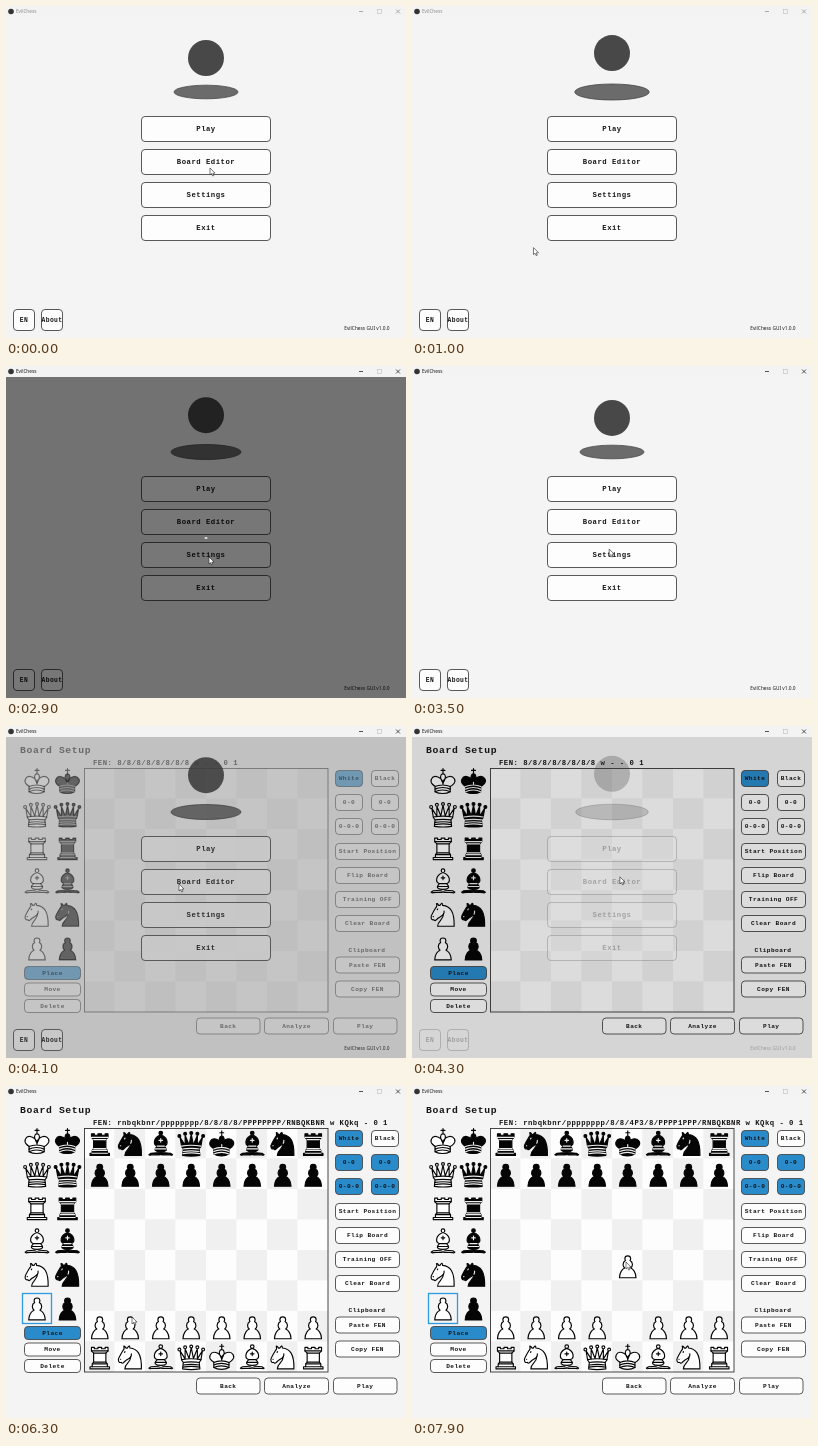
An HTML page with a canvas that plays this animation: 400x332 px, repeating every 8000 ms.

```html
<!DOCTYPE html>
<html lang="en">
<head>
<meta charset="utf-8">
<title>EvilChess</title>
<style>
html, body { margin: 0; width: 400px; height: 332px; overflow: hidden; background: #f4f4f4; }
canvas { display: block; }
</style>
</head>
<body>
<canvas id="stage" width="400" height="332"></canvas>
<script>
const ctx = document.getElementById('stage').getContext('2d');
const LOOP = 8000, STEP = 100;
const INK = '#151515', BLUE = '#2a8bcb', PAPER = '#f4f4f4';
const MONO = '"Liberation Mono", "DejaVu Sans Mono", monospace';
const SANS = '"Noto Sans", "Open Sans", sans-serif';
const SQUARE = 30.5, BOARD_X = 78, BOARD_Y = 42;

const clamp = v => Math.max(0, Math.min(1, v));
const ramp = (t, from, to) => clamp((t - from) / (to - from));

// Pointer stops: time, x, y
const PATH = [
  [0, 204, 162], [300, 204, 162], [900, 128, 236], [1500, 40, 312], [1600, 40, 312],
  [1800, 60, 287], [2500, 203, 191], [2900, 203, 191], [3400, 200, 186],
  [3900, 173, 158], [4100, 173, 158], [4800, 349, 122], [5100, 349, 122],
  [5900, 30, 222], [6000, 30, 222], [6300, 126, 231], [6700, 216, 240],
  [6800, 216, 240], [7300, 214, 176], [8000, 214, 176]
];

function pointerAt(t) {
  const i = Math.max(1, PATH.findIndex(p => p[0] > t));
  const [t0, x0, y0] = PATH[i - 1], [t1, x1, y1] = PATH[i];
  const k = ramp(t, t0, t1), e = k * k * (3 - 2 * k);
  return [x0 + (x1 - x0) * e, y0 + (y1 - y0) * e];
}

// Chess pieces on a 45 unit square: filled body and inner lines
const ball = (x, y, r) => `M${x - r} ${y}a${r} ${r} 0 1 1 ${2 * r} 0a${r} ${r} 0 1 1 ${-2 * r} 0z`;
const shape = (body, lines = '') => [new Path2D(body), new Path2D(lines)];
const PIECES = {
  k: shape(`M22.5 12V5h0M19.8 7.5h5.4M22.5 25s4.5-7.5 3-10.5c-1-3-5-3-6 0-1.5 3 3 10.5 3 10.5
    M11.5 37c5.5 3.5 15.5 3.5 21 0v-7s9-4.5 6-10.5c-4-6.5-13.5-3.5-16 4c-3.5-7.5-13-10.5-16-4-3 6 5 10 5 10z`,
    'M22.5 24v3M11.5 30c5.5-3 15.5-3 21 0M11.5 33.5c5.5-3 15.5-3 21 0M11.5 37c5.5-3 15.5-3 21 0'),
  q: shape(`M9 26l-2-12 7 11V11l5.5 13.5 3-15 3 15L31 11v14l7-11-2 12c0 2-1.5 2-2.5 4l1 9
    c-6.5 1-17.5 1-24 0l1-9c-1-2-2.5-2-2.5-4z`
    + ball(6, 12, 2) + ball(14, 9, 2) + ball(22.5, 8, 2) + ball(31, 9, 2) + ball(39, 12, 2),
    'M9 26c8.5-1.5 18.5-1.5 27 0M11.5 30c3.5-1 18.5-1 22 0M11.5 33.5c6-1 16-1 22 0M11 36.5c6-1 17-1 23 0'),
  r: shape('M9 39v-3h3v-4l2-2.5V17l-3-3V9h4v2h5V9h5v2h5V9h4v5l-3 3v12.5l2 2.5v4h3v3z',
    'M12 36h21M12.5 32h20M14 29.5h17M14 17h17M11 14h23'),
  b: shape(`M9 36c3.4-1 10.1.4 13.5-2 3.4 2.4 10.1 1 13.5 2l3 2c-.7 1-1.6 1-3 .5-3.4-1-10.1.5-13.5-1
    -3.4 1.5-10.1 0-13.5 1-1.4.5-2.3.5-3-.5z
    M15 32c2.5 2.5 12.5 2.5 15 0 1-2-.5-4-2.5-6 5.5-1.5 6-11.5-5-15.5-11 4-10.5 14-5 15.5-2 2-3.5 4-2.5 6z`
    + ball(22.5, 8, 2.5), 'M17.5 26h10M15 30h15M22.5 15.5v5M20 18h5'),
  n: shape(`M22 10c10.5 1 16.5 8 16 29H15c0-8 8-8 8.2-17-1 2-5 4-7.2 5.5-3 2-2.8 4-5 3.5l-1-1
    c-1 0-4 1-4-4 0-2 6-12 6-12s1.9-1.9 2-3.5l-.5-3c1-1 3 2.5 3 2.5h2s.8-2 2.5-3c1 0 1 3 1 3z`,
    'M8.8 25.5h.4M14.6 16l.6-1M24 18c.2 2 0 3-.8 4'),
  p: shape(`M22.5 9c-2.2 0-4 1.8-4 4 0 .9.3 1.7.8 2.4-2 1.1-3.3 3.2-3.3 5.6 0 2 .9 3.8 2.4 5
    -3 1.1-7.4 5.6-7.4 13.5h23c0-7.9-4.4-12.4-7.4-13.5 1.5-1.2 2.4-3 2.4-5 0-2.4-1.3-4.5-3.3-5.6
    .5-.7.8-1.5.8-2.4 0-2.2-1.8-4-4-4z`)
};

function piece(letter, cx, cy) {
  const white = letter < 'a';
  const [body, lines] = PIECES[letter.toLowerCase()];
  ctx.save();
  ctx.translate(cx, cy);
  ctx.scale(.72, .72);
  ctx.translate(-22.5, -22.5);
  ctx.lineWidth = 1.6;
  ctx.lineJoin = ctx.lineCap = 'round';
  ctx.fillStyle = white ? '#fff' : '#050505';
  ctx.fill(body);
  ctx.strokeStyle = '#050505';
  ctx.stroke(body);
  ctx.strokeStyle = white ? '#050505' : '#eee';
  ctx.stroke(lines);
  ctx.restore();
}

function text(str, x, y, size, { align = 'center', color = INK, font = MONO, weight = 'bold', spacing = 0 } = {}) {
  ctx.font = `${weight} ${size}px ${font}`;
  ctx.letterSpacing = spacing + 'px';
  ctx.textAlign = align;
  ctx.textBaseline = 'alphabetic';
  ctx.fillStyle = color;
  ctx.fillText(str, x, y);
}

// Low, widely set letters of the interface
const label = (str, x, y, size, align) =>
  text(str, x, y, size * .9, { align, spacing: size * .06 });

function button(str, x, y, w, h, size = 6.85, fill = '#fdfdfd') {
  ctx.beginPath();
  ctx.roundRect(x + .5, y + .5, w - 1, h - 1, 3.5);
  ctx.fillStyle = fill;
  ctx.fill();
  ctx.strokeStyle = '#484848';
  ctx.lineWidth = .9;
  ctx.stroke();
  label(str, x + w / 2, y + h / 2 + size * .24, size);
}

function titleBar(active) {
  const color = active ? '#111' : '#8a8a8a';
  ctx.fillStyle = '#f3f3f3';
  ctx.fillRect(0, 0, 400, 11);
  ctx.fillStyle = '#333';
  ctx.beginPath();
  ctx.arc(5, 5.5, 2.8, 0, 7);
  ctx.fill();
  text('EvilChess', 10, 7.3, 4.7, { align: 'left', color, font: SANS, weight: '' });
  ctx.lineWidth = .7;
  ctx.strokeStyle = color;
  ctx.beginPath();
  ctx.moveTo(353, 5.5); ctx.lineTo(357, 5.5);
  ctx.moveTo(390, 3.5); ctx.lineTo(394, 7.5);
  ctx.moveTo(394, 3.5); ctx.lineTo(390, 7.5);
  ctx.stroke();
  ctx.strokeStyle = '#c4c4c4';
  ctx.strokeRect(371.5, 3.5, 4, 4);
}

function menu(t) {
  // The floating emblem rests while the dialog is up.
  const run = t < 1550 ? t : t < 2950 ? 1550 : t - 1400;
  const lift = (1 - Math.cos(2 * Math.PI * run / 2125)) / 2;
  ctx.beginPath();
  ctx.ellipse(200, 86, 32 + 5.3 * lift, 6.8 + 1.2 * lift, 0, 0, 7);
  ctx.fillStyle = '#6b6b6b';
  ctx.fill();
  ctx.strokeStyle = '#484848';
  ctx.lineWidth = .8;
  ctx.stroke();
  ctx.beginPath();
  ctx.arc(200, 52 - 5 * lift, 18, 0, 7);
  ctx.fillStyle = '#484848';
  ctx.fill();
  ['Play', 'Board Editor', 'Settings', 'Exit'].forEach((str, i) =>
    button(str, 135, 110 + 33 * i, 130, 26, 8.1));
  button('EN', 7, 303, 22, 22, 7);
  button('About', 35, 303, 22, 22, 7);
  text('EvilChess GUI v1.0.0', 383.5, 323.5, 4.8, { align: 'right', font: SANS, weight: '' });
}

function dialog(t) {
  const scale = Math.min(ramp(t, 1596, 1796), ramp(t, 2904, 2704));
  if (!scale) return;
  ctx.save();
  ctx.translate(200, 172);
  ctx.scale(scale, scale);
  ctx.translate(-200, -172);
  button('', 135, 139, 130, 66);
  label('About', 200, 153, 8.1);
  text('EvilChess GUI v1.0.0', 200, 168, 5.5, { font: SANS, weight: '' });
  button('OK', 175, 181, 50, 18);
  ctx.restore();
}

function position(t) {
  if (t < 4900) return '8/8/8/8/8/8/8/8 w - - 0 1';
  const rows = t < 6800 ? '8/8/8/8/PPPPPPPP' : t < 7400 ? '8/8/8/8/PPPP1PPP' : '8/8/4P3/8/PPPP1PPP';
  return `rnbqkbnr/pppppppp/${rows}/RNBQKBNR w KQkq - 0 1`;
}

function board(fen) {
  for (let i = 0; i < 64; i++) {
    const col = i % 8, row = i >> 3;
    ctx.fillStyle = (col + row) % 2 ? '#f0f0f0' : '#fdfdfd';
    ctx.fillRect(BOARD_X + col * SQUARE, BOARD_Y + row * SQUARE, SQUARE, SQUARE);
  }
  ctx.strokeStyle = '#333';
  ctx.lineWidth = .9;
  ctx.strokeRect(BOARD_X + .5, BOARD_Y + .5, 243.5, 243.5);
  fen.split(' ')[0].split('/').forEach((line, row) => {
    let col = 0;
    for (const c of line) {
      if (c > '0' && c < '9') { col += +c; continue; }
      piece(c, BOARD_X + (col + .5) * SQUARE + .5, BOARD_Y + (row + .5) * SQUARE + .3);
      col++;
    }
  });
}

function editor(t) {
  const fen = position(t);
  const castle = t < 4900 ? undefined : BLUE;
  label('Board Setup', 14, 27, 10.8, 'left');
  label('FEN: ' + fen, 87, 39.3, 8.07, 'left');
  board(fen);

  [...'kqrbnp'].forEach((c, i) => {
    const y = 55.2 + 33.3 * i;
    piece(c.toUpperCase(), 31, y);
    piece(c, 61.5, y);
  });
  if (t >= 6000) {
    ctx.strokeStyle = '#2e9be0';
    ctx.lineWidth = 1.3;
    ctx.strokeRect(16.5, 207.5, 29, 30);
  }
  button('Place', 18, 240, 57, 14, 6.85, BLUE);
  button('Move', 18, 256.5, 57, 14);
  button('Delete', 18, 273, 57, 14);

  button('White', 329, 44, 28, 17, 6.85, BLUE);
  button('Black', 365, 44, 28, 17);
  for (const x of [329, 365]) {
    button('0-0', x, 68, 28, 17, 6.85, castle);
    button('0-0-0', x, 92, 28, 17, 6.85, castle);
  }
  ['Start Position', 'Flip Board', 'Training OFF', 'Clear Board'].forEach((str, i) =>
    button(str, 329, 117 + 24 * i, 65, 17));
  label('Clipboard', 361, 226, 6.85);
  button('Paste FEN', 329, 230.5, 65, 17);
  button('Copy FEN', 329, 254.5, 65, 17);
  button('Back', 190, 291.5, 64.5, 17);
  button('Analyze', 258, 291.5, 65, 17);
  button('Play', 327, 291.5, 64.5, 17);
}

function cover(color) {
  ctx.fillStyle = color;
  ctx.fillRect(0, 11, 400, 321);
}

function pointer([x, y]) {
  ctx.beginPath();
  [[0, 0], [0, 7], [1.6, 5.6], [2.7, 8], [3.8, 7.5], [2.8, 5.2], [5, 5.1]]
    .forEach(([dx, dy]) => ctx.lineTo(x + dx, y + dy));
  ctx.closePath();
  ctx.fillStyle = '#fff';
  ctx.fill();
  ctx.strokeStyle = '#222';
  ctx.lineWidth = .6;
  ctx.stroke();
}

function layer(paint, t, alpha) {
  if (!alpha) return;
  ctx.globalAlpha = alpha;
  paint(t);
  ctx.globalAlpha = 1;
}

function draw(t) {
  cover(PAPER);
  layer(editor, t, ramp(t, 3900, 4300));
  layer(menu, t, ramp(t, 4400, 4050));
  const modal = .53 * Math.min(ramp(t, 1450, 1600), ramp(t, 3300, 2950));
  const fade = .22 * Math.sin(Math.PI * ramp(t, 3900, 4400));
  cover(`rgba(0,0,0,${modal + fade})`);
  dialog(t);
  titleBar(t >= 1500);
  pointer(pointerAt(t));
}

const start = performance.now();
function tick() {
  const t = Math.max(0, performance.now() - start) % LOOP;
  draw(Math.floor(t / STEP) * STEP);
  requestAnimationFrame(tick);
}
tick();
</script>
</body>
</html>
```
